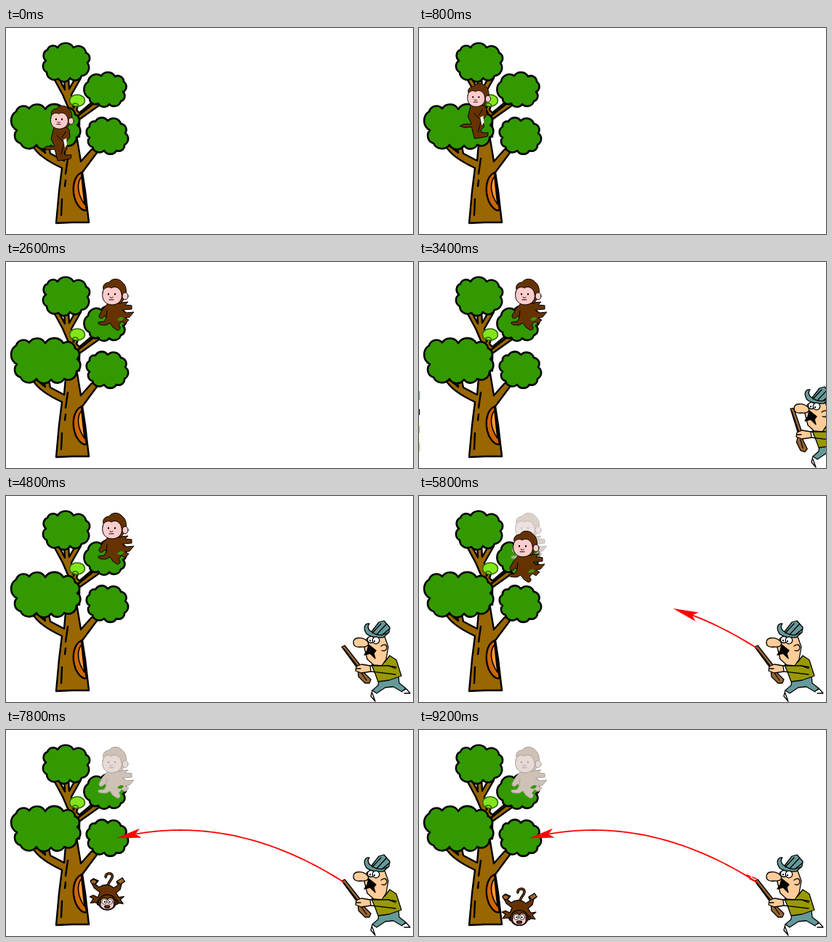
An HTML page that plays this animation: 560x284 px, repeating every 9400 ms.

```html
<!DOCTYPE html>
<html lang="en">
<head>
<meta charset="utf-8">
<title>Monkey and hunter</title>
<style>
  html, body { margin: 0; height: 100%; overflow: hidden; background: #fff; }
  svg { display: block; width: 100vw; height: 100vh; --fur: #663300; --skin: #ffcccc; --ink: #000; }
  .pale { --fur: #cfc1b6; --skin: #e6d9d6; --ink: #aaa19c; }
  .wood { fill: #996600; }
  .leaf { fill: #339900; stroke-width: 2.6; }
  .fur { fill: var(--fur); stroke: var(--ink); }
  .skin { fill: var(--skin); stroke: var(--ink); }
  .line { fill: none; stroke: var(--ink); }
  .peach { fill: #ffcc99; }
  .teal { fill: #669999; }
  .olive { fill: #999900; }
</style>
</head>
<body>
<svg viewBox="0 0 560 284" stroke-linecap="round" stroke-linejoin="round">
  <defs>
    <g id="head">
      <path class="fur" d="M134 38C132 31 138 28 142 28C145 22 156 22 160 28C165 31 167 40 164 49L158 57L140 57Z"/>
      <ellipse class="skin" cx="164" cy="47" rx="4" ry="5"/>
      <path class="skin" d="M133 42C134 35 141 33 145 36C150 32 158 36 159 44C161 53 154 59 146 59C137 59 131 52 133 42Z"/>
      <path class="line" stroke-width="2.2" d="M141 44v.6M150 44v.6"/>
      <path class="line" d="M143 48.5l2 1M146 49l1-.4M148 52h-6"/>
    </g>
    <g id="sitter">
      <path class="fur" d="M141 56L133 65L128 74C128 79 132 79 136 74L138 77L135 82L127 83C126 87 131 87 138 87L143 84L147 90L153 94C158 94 158 89 155 87L159 82L164 85L169 80L164 77L170 76L176 69L166 70L161 66L173 65V60L164 59L168 55L158 56Z"/>
      <path fill="#339900" d="M153 80q4-6 9-3q-2 6-9 3Z"/>
      <path class="line" d="M139 67L138 76M160 66L164 70"/>
      <use href="#head"/>
    </g>
    <g id="climber">
      <path class="fur" d="M66 137L62 153L67 163L56 163L51 166L58 168L67 167L71 183L80 182L89 180L90 175L81 175L80 171L84 167L83 157L88 150L87 140L82 136Z"/>
      <path class="line" d="M70 148L80 158L76 174M82 143L77 151"/>
      <path fill="#fff" d="M79 154l4-2l1 9l-3 4Z"/>
      <use href="#head" transform="translate(-58 86) scale(.9)"/>
    </g>
    <g id="faller" stroke-width="1.2">
      <path class="line" stroke-width="3.6" d="M139 238C138 230 146 228 145 222C143 217 135 219 136 224"/>
      <path class="line" style="stroke:#663300" stroke-width="1.8" d="M139 238C138 230 146 228 145 222C143 217 135 219 136 224"/>
      <path class="fur" d="M127 238L122 234L126 229L119 226L115 229L117 233L120 239L128 245L125 252L119 249L114 251L119 254L115 260L121 259L130 262H147L155 260L160 261L156 255L161 251L154 252L150 246L156 241L158 233L162 230L158 226L151 231L153 235L147 239Q137 231 127 238Z"/>
      <path fill="#996633" stroke="#000" d="M115 230q4-5 9 0l-3 4q-5 0-6-4ZM151 230l8-5l3 5l-6 4Z"/>
      <circle class="fur" cx="127" cy="260" r="3"/><circle class="fur" cx="150" cy="259" r="3"/>
      <ellipse class="fur" cx="138" cy="259" rx="12" ry="10.5"/>
      <path class="skin" d="M129 259C128 252 136 251 138 255C141 250 149 253 147 260C149 267 142 269 138 269C132 269 127 265 129 259Z"/>
      <ellipse cx="134" cy="258" rx="3.2" ry="3.6" fill="#fff" stroke="#000" stroke-width=".7"/>
      <ellipse cx="142" cy="258" rx="3.2" ry="3.6" fill="#fff" stroke="#000" stroke-width=".7"/>
      <path stroke="#000" stroke-width="2" d="M134.500 258v.5M141.500 258v.5"/>
      <ellipse cx="138" cy="265" rx="3.500" ry="1.800" fill="#663300" stroke="#000"/>
    </g>
  </defs>

  <g stroke="#000" stroke-width="2.4">
    <path class="wood" d="M65 68L78 92L90 120L94 150H101V126L132 104L120 101L101 117L97 113L100 104H95L93 110L90 92L103 69L96 68L87 84L86 69H80L81 85L72 68Z"/>
    <path class="wood" d="M83 148L80 183L61 173L59 164H52L54 172L43 163H37Q45 178 77 193L73 225L69 269L91 268L114 268L109 225L105 199L128 168L118 167L103 184L97 148Z"/>
    <path fill="none" d="M98 122L122 103M85 180L82 201M82 210L81 218M77 236L76 258"/>
    <path fill="#cc6600" d="M104 199C92 205 90 224 96 239C101 249 107 253 111 251L107 228Z"/>
    <path fill="#ff9933" stroke-width="1.600" d="M104 205C97 213 98 229 108 243L106 225Z"/>
    <g id="leaves"></g>
    <ellipse cx="98" cy="100" rx="10.500" ry="8" fill="#80e61a" stroke="#336600" stroke-width="1.500"/>
    <path fill="none" stroke="#336600" stroke-width="1.500" d="M91 106q5-5 9 1"/>
  </g>

  <use id="ghost" class="pale" href="#sitter"/>
  <use id="monkey"/>

  <g id="hunter" stroke="#000" stroke-width="1.300">
    <path class="teal" d="M513 253L540 247L541 258L550 265L545 270L533 263L522 264L510 272L504 268L512 261Z"/>
    <path fill="#fff" d="M504 268L502 276L508 283L504 272M545 269L551 266L556 272H548"/>
    <path class="olive" d="M503 233L521 229L528 220L537 226L544 248L527 254L512 256L508 245Z"/>
    <path class="peach" d="M492 205L497 196L521 194L526 208L523 225L517 234L506 233L497 225Z"/>
    <path class="teal" d="M496 190C491 183 493 175 500 176C497 179 498 185 503 187L513 174L520 172L528 181L527 188L519 195Q504 196 496 190Z"/>
    <path fill="none" d="M504 189L516 176M510 191L523 177M517 192L528 183M503 187Q512 195 525 189"/>
    <circle cx="502" cy="198" r="4.500" fill="#fff"/>
    <circle cx="509" cy="199" r="4.800" fill="#fff"/>
    <path stroke-width="2" d="M501 199v.5M507 200v.5"/>
    <path class="peach" d="M478 202C478 194 490 194 497 200C501 205 497 209 489 208C482 209 478 207 478 202Z"/>
    <path d="M499 205L509 213L506 217L508 224L501 217L493 219L497 213Z"/>
    <path class="peach" d="M516 207q7-5 8 2q-1 6-7 4"/>
    <g id="gun">
      <path fill="#996633" d="M462 208L466 206L488 234L491 242L502 253L500 258L494 258L485 249L484 238Z"/>
      <path fill="none" d="M465 211L486 238M489 244L496 254"/>
    </g>
    <path class="olive" d="M500 234L526 234L536 238M536 246L502 242Z"/>
    <path class="peach" d="M501 234L489 232L482 235L481 241L489 244L502 242Z"/>
    <path fill="none" d="M482 238h6M526 234L537 236"/>
  </g>

  <g id="arrow" fill="red" stroke="red">
    <path id="shaft" fill="none" stroke-width="1.800"/>
    <path id="tip" stroke="none" d="M0 0L35 -6.500L28 0L35 6.500Z"/>
  </g>
  <path id="sparks" fill="none" stroke="red" stroke-width="1.600" d="M451 200l5 2M459 203l5 2M455 205l8 4"/>
  <g id="edge">
    <path fill="#669999" d="M0 178h1v12H0Z"/><path d="M0 203h1v8H0Z"/>
    <path fill="#cccc00" d="M0 226h1v10H0ZM0 249h1v12H0Z"/>
  </g>
</svg>
<script>
const $ = id => document.getElementById(id);
const LOOP = 9400, STEP = 200;

// Leafy outline: an outward arc between each pair of neighbouring notches.
function cloud(points) {
  let d = `M${points[0]}`;
  points.forEach((p, i) => {
    const q = points[(i + 1) % points.length];
    const r = Math.hypot(q[0] - p[0], q[1] - p[1]) * .58;
    d += `A${r} ${r} 0 0 1 ${q}`;
  });
  return `<path class="leaf" d="${d}Z"/>`;
}
$('leaves').innerHTML = [
  [[55, 45], [57, 30], [71, 27], [93, 27], [110, 34], [112, 48], [104, 66], [88, 69], [72, 70], [56, 61]],
  [[113, 74], [131, 66], [150, 67], [162, 74], [161, 88], [158, 101], [142, 105], [127, 104], [115, 97]],
  [[14, 115], [32, 111], [54, 112], [79, 112], [95, 119], [98, 134], [97, 151], [80, 161], [62, 162], [42, 161], [20, 159], [15, 141]],
  [[115, 136], [123, 129], [140, 128], [158, 132], [164, 145], [163, 161], [152, 169], [135, 169], [119, 164], [115, 151]]
].map(cloud).join('');

const show = (id, on) => $(id).style.display = on ? '' : 'none';
const place = (id, x, y) => $(id).setAttribute('transform', `translate(${x} ${y})`);

// Keys are [time, x, y].
function along(keys, t) {
  const i = keys.findIndex(k => k[0] > t);
  if (i < 0) return keys[keys.length - 1].slice(1);
  const a = keys[i - 1], b = keys[i], u = (t - a[0]) / (b[0] - a[0]);
  return [a[1] + (b[1] - a[1]) * u, a[2] + (b[2] - a[2]) * u];
}
const climb = [[0, 0, 0], [400, 0, 0], [1000, 8, -46]];
const leap = [[1000, -66, 30], [1400, -48, -20], [1600, -26, -18], [1800, -6, 12], [2000, -3, 5], [2200, 0, 0]];

function drawMonkey(t) {
  const s = Math.max(0, (t - 5100) / 1000), drop = 41 * s ** 1.4;
  let pose = 'sitter', at;
  if (t < 1000) {
    pose = 'climber';
    at = along(climb, t);
  } else if (s === 0) {
    at = along(leap, t);
  } else if (t < 6400) {
    at = [-Math.min(3, s * 5), drop];
  } else {
    pose = 'faller';
    const y = Math.min(0, drop - 186);
    at = [-y * 5 / 85, y];
  }
  $('monkey').setAttribute('href', '#' + pose);
  place('monkey', ...at);
  show('ghost', s > 0);
  $('ghost').style.opacity = Math.min(1, .45 + s * .4);
}

function drawHunter(t) {
  show('hunter', t >= 2600);
  place('hunter', Math.max(0, 95 - (t - 2600) * .0712), 0);
  $('gun').setAttribute('transform', `rotate(${t < 4000 ? 19 : 0} 485 238)`);
  show('edge', t >= 2800 && t < 3600);
}

const flight = x => 138 + .00142 * (x - 240) ** 2;
function drawArrow(t) {
  show('arrow', t >= 5200);
  show('sparks', t >= 8600);
  const x = Math.max(151, 465 - (t - 5100) * .165);
  const angle = Math.atan(.00284 * (x + 15 - 240)) * 180 / Math.PI;
  let d = `M465 ${flight(465)}`;
  for (let px = 460; px > x + 25; px -= 5) d += `L${px} ${flight(px)}`;
  $('shaft').setAttribute('d', d);
  $('tip').setAttribute('transform', `translate(${x} ${flight(x)}) rotate(${angle}) scale(${Math.min(1, (465 - x) / 35)})`);
}

function draw(now) {
  const t = Math.floor(now % LOOP / STEP) * STEP;
  drawMonkey(t);
  drawHunter(t);
  drawArrow(t);
  requestAnimationFrame(draw);
}
draw(0);
</script>
</body>
</html>
```
